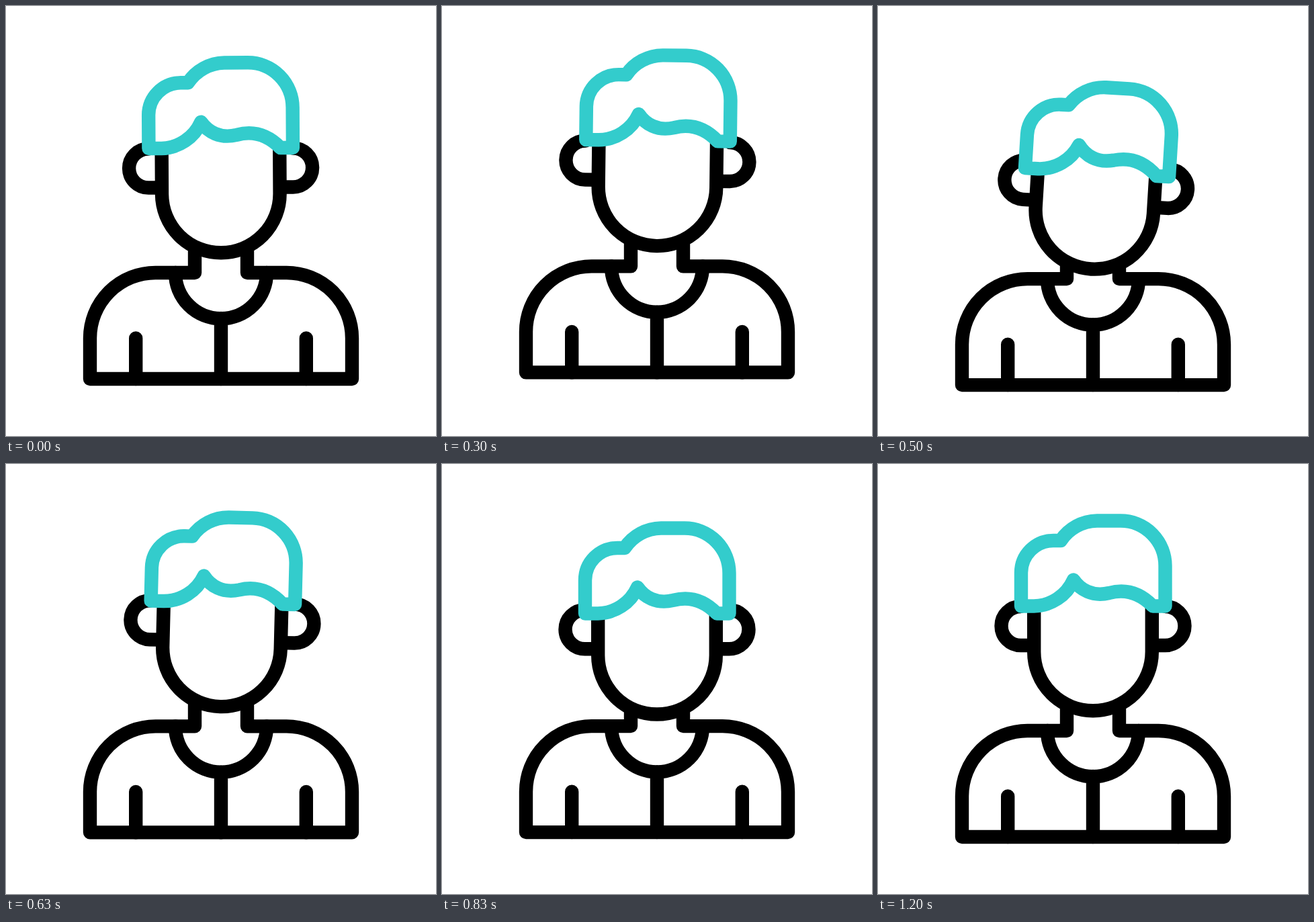
These frames come from a looping animation (640 px wide and 640 px high, 1670 ms). An HTML page:

```html
<!DOCTYPE html>
<html lang="en">
<head>
<meta charset="utf-8">
<title>Nodding man</title>
<style>
  html, body { margin: 0; height: 100%; overflow: hidden; background: #fff; }
  svg { display: block; width: 100%; height: 100%; }
</style>
</head>
<body>
<svg viewBox="0 0 640 640" fill="none" stroke="#000" stroke-width="20.4" stroke-linecap="round" stroke-linejoin="round">
  <g id="body">
    <path d="M281 330V397H222.500A97.500 97.500 0 0 0 125 494.500V555H515V494.500A97.500 97.500 0 0 0 417.500 397H359V330"/>
    <path d="M252 397a68 68.300 0 0 0 136 0M320 465V555M193.200 494.500V555M446.800 494.500V555"/>
  </g>
  <g id="head">
    <path d="M212.500 212a29 29 0 0 0 0 58H230M427.500 212a29 29 0 0 1 0 58H410"/>
    <path fill="#fff" d="M232.200 196V279.500a87.800 87.800 0 0 0 175.600 0V196"/>
    <path id="hair" fill="#fff" stroke="#33cccc" d="M213 211.500V162A48 48 0 0 1 261 114H272A66 66 0 0 1 326 84.500H361A66.500 67 0 0 1 427.500 152V211.500H409C391 193 370 185 344 192C319 198 301 187 291 172.500A66 66 0 0 1 232 211.500Z"/>
  </g>
</svg>
<script>
  const LOOP = 1670, FPS = 30;
  const [body, head, hair] = ["body", "head", "hair"].map(id => document.getElementById(id));

  // Sine easing from each value to the next
  function ease(t, times, values) {
    const i = times.findIndex(time => time > t);
    if (i < 0) return values.at(-1);
    const p = (t - times[i - 1]) / (times[i] - times[i - 1]);
    return values[i - 1] + (values[i] - values[i - 1]) * (1 - Math.cos(Math.PI * p)) / 2;
  }

  // Two dips, each followed by a rise, then a softer settle; lead makes a part dip earlier
  function bounce(t, dip, rise, settle, lead = 0) {
    const times = [0, 140 - lead, 295, 465 - lead, 690 + lead / 2, 940 + lead, 1200];
    return ease(t, times, [0, dip, -rise, dip, -rise * 1.15, settle, 0]);
  }

  function draw(now) {
    const t = Math.floor((now % LOOP + 4) * FPS / 1000) * 1000 / FPS;
    const bodyY = bounce(t, 14.5, 9.7, 1, 60);
    const headY = bounce(t, 26.5, 10.3, 16);
    const hairY = bounce(t, 39, 11.3, 26);
    const tilt = ease(t, [-25, 110, 450, 770], [0, -3.7, 3.7, 0]);
    body.setAttribute("transform", `translate(0 ${bodyY})`);
    head.setAttribute("transform", `translate(0 ${headY}) rotate(${tilt} 320 318)`);
    hair.setAttribute("transform", `translate(0 ${hairY - headY})`);
  }

  const start = performance.now();
  function tick() {
    draw(performance.now() - start);
    requestAnimationFrame(tick);
  }
  tick();
</script>
</body>
</html>
```
